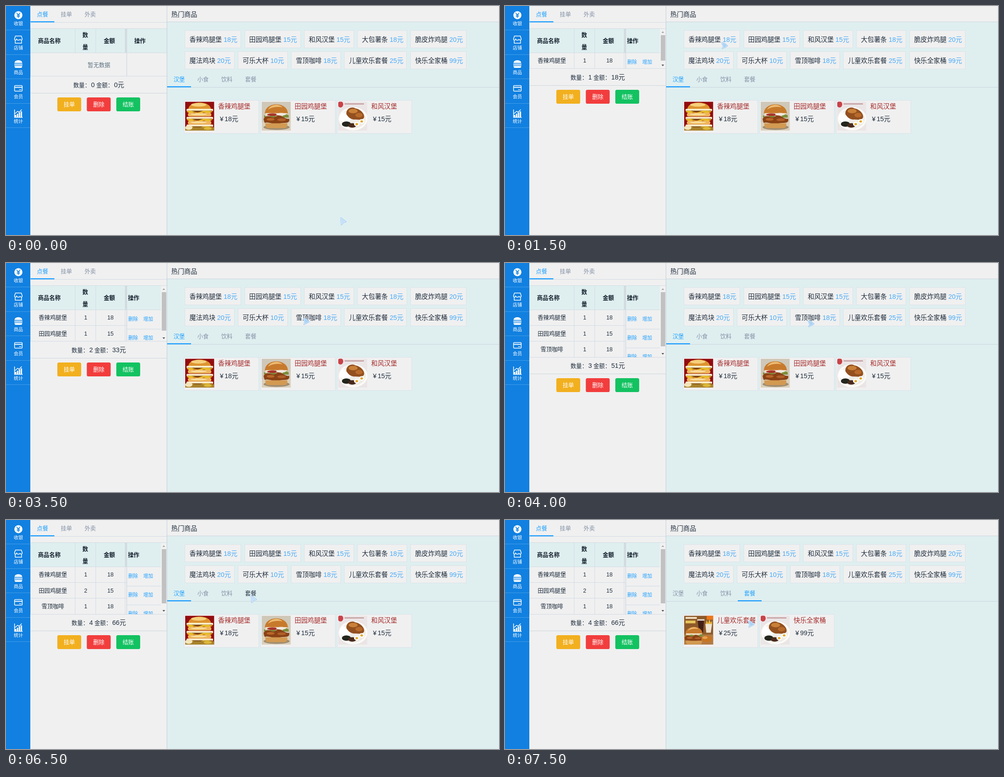
An HTML page for the animation above (8000 ms loop, 1095 by 511 pixels).

```html
<!DOCTYPE html>
<html lang="zh-CN">
<head>
<meta charset="utf-8">
<style>
html, body { margin: 0; width: 100%; height: 100%; overflow: hidden; background: #f0f0f0; }
svg { display: block; }
#stage { width: 1095px; height: 511px; font-family: "Liberation Sans", "Noto Sans CJK SC", "Noto Sans CJK", sans-serif; }
text { white-space: pre; }
.colon { font-family: "Noto Sans CJK TC", "Noto Sans CJK", sans-serif; }
</style>
</head>
<body>
<svg id="stage" viewBox="0 0 1095 511"></svg>
<script>
const INK = '#1f2d3d', BLUE = '#20a0ff', PANEL = '#f0f0f0', MINT = '#dfeff0', LINE = '#d1dbe5', GREY = '#8391a5', HEAD = '#14202c';
const MENU = [['香辣鸡腿堡', 18], ['田园鸡腿堡', 15], ['和风汉堡', 15], ['大包薯条', 18], ['脆皮炸鸡腿', 20],
  ['魔法鸡块', 20], ['可乐大杯', 10], ['雪顶咖啡', 18], ['儿童欢乐套餐', 25], ['快乐全家桶', 99]];
const STEP = 500, LOOP = 8000;
// pointer for every step: x, y, pressed
const POINTER = [[743, 472], [519, 191], [484, 81], [481, 81, 1], [484, 81], [557, 83], [557, 83, 1], [660, 123, 1],
  [673, 128, 1], [673, 255], [673, 255, 1], [673, 255], [610, 205], [544, 168], [544, 168], [540, 225, 1]];

const rect = (x, y, w, h, fill, more = '') => `<rect x="${x}" y="${y}" width="${w}" height="${h}" fill="${fill}" ${more}/>`;
const hline = (x, y, w, color = LINE) => rect(x, Math.round(y), w, 1, color);
const vline = (x, y, h, color = LINE) => rect(x, y, 1, h, color);
// a filled box with a sharp one pixel border
const box = (x, y, w, h) => rect(Math.round(x) - .5, y, Math.round(w), h, PANEL, 'stroke="#d9e2ea"');
const path = (d, fill, more = '') => `<path d="${d}" fill="${fill}" ${more}/>`;
const oval = (x, y, rx, ry, fill) => `<ellipse cx="${x}" cy="${y}" rx="${rx}" ry="${ry}" fill="${fill}"/>`;
// y is the vertical middle of the glyphs
const text = (x, y, str, size = 12.6, fill = INK, more = '') =>
  `<text x="${x}" y="${y + size * .37}" font-size="${size}" fill="${fill}" ${more}>${str}</text>`;
const MID = ' text-anchor="middle"', BOLD = ' font-weight="bold"', LIGHT = ' font-weight="300"', MEDIUM = ' font-weight="500"';

function sidebar() {
  const stroke = 'stroke="#fff" stroke-width="1.5"';
  const icons = [
    oval(27.5, 20.5, 9, 9, '#fff') + path('M23.5 15l4 5 4-5M27.5 20v6.5M24 20.5h7M24 23.5h7', 'none', 'stroke="#1180e0" stroke-width="1.5"'),
    path('M21 67h13l2 6c0 4-4 4-4.5 1c-1 3-7 3-8 0c-1 3-5 3-4.5-1zM20.5 76v7h14v-7', 'none', stroke),
    path('M19 127c0-8 17-8 17 0zM19 134h17c0 4-2 4-4 4h-9c-2 0-4 0-4-4z', '#fff') + rect(18.5, 128.5, 18, 1.6, '#fff') + rect(18.5, 131.2, 18, 1.6, '#fff'),
    rect(19, 177.5, 17, 12.5, 'none', stroke + ' rx="1.5"') + rect(19, 180.5, 17, 2, '#fff') + rect(29, 186, 5, 1.2, '#fff'),
    [0, 1, 2, 3].map(i => rect(20 + i * 4.2, 243 - i * 2.6, 3, 5 + i * 2.6, '#fff')).join('') +
      path('M19 231v17.5h18M20 240l6-5 3 2 6-6', 'none', stroke)
  ];
  return rect(0, 0, 54, 511, '#1180e0') + ['收银', '店铺', '商品', '会员', '统计'].map((label, i) =>
    icons[i] + text(27.5, 38.7 + i * 54.5, label, 10.3, '#fff', MID + MEDIUM) + hline(0, 53.4 + i * 54.5, 54, '#459fe9')).join('');
}

function tabs(labels, x, y, barY, active, hover) {
  return labels.map((label, i) =>
    text(x + 14 + i * 53, y, label, 12.6, i === active ? BLUE : i === hover ? INK : GREY)).join('') +
    rect(x + active * 53, barY, 53, 2.5, BLUE);
}

function scrollbar(bottom, thumb) {
  return rect(344, 51, 13, bottom - 51, '#f1f1f1') + rect(346, 65, 10, thumb, '#c1c1c1') +
    path('M347.5 60l3-3.5 3 3.5z', '#a3a3a3') + path(`M347.5 ${bottom - 9}l3 3.5 3-3.5z`, '#505050');
}

function orderTable(order) {
  const n = order.length, bottom = n ? 104.5 + n * 35.2 : 157, right = n ? 344 : 357;
  const heading = (x, y, label) => text(x, y, label, 12.6, HEAD, BOLD);
  let out = rect(55, 51, right - 55, 53, MINT) + hline(55, 50, 302) +
    heading(71, 77.5, '商品名称') + heading(169.7, 64.5, '数') + heading(169.7, 91, '量') +
    heading(217, 77.5, '金额') + heading(n ? 271 : 285, 77.5, '操作') +
    rect(264, 51, 5, 53, '#d2dcdf') + hline(55, 104, right - 55) + vline(54, 51, bottom - 51);
  for (const x of [153, 199]) out += vline(x, 51, (n ? bottom : 104) - 51);
  out += rect(267.5, 104, 1.5, bottom - 104, '#d3d9e0');
  if (n) {
    out += vline(264, 104, bottom - 104) + '<clipPath id="rows">' + rect(55, 51, 303, bottom - 51, '#000') + '</clipPath><g clip-path="url(#rows)">';
    order.forEach(([item, count], i) => {
      const y = 121.7 + i * 35.2, opY = 125 + i * 42.2;
      const [name, price] = MENU[item];
      out += text(104, y, name, 12.6, INK, MID) + text(177, y, count, 12.6, INK, MID) + text(232, y, price, 12.6, INK, MID) +
        hline(55, 104 + (i + 1) * 35.2, 213) + hline(269, opY + 21.8, 75) +
        text(271.5, opY, '删除', 10.8, BLUE) + text(305, opY, '增加', 10.8, BLUE);
    });
    out += '</g>' + scrollbar(bottom, [57, 86, 121][n - 1]);
  } else out += text(206.5, 131.5, '暂无数据', 12.6, '#5e7382', MID);
  return out + hline(55, bottom - .6, 302) + summary(order, bottom);
}

function summary(order, top) {
  const count = order.reduce((sum, [, c]) => sum + c, 0);
  const total = order.reduce((sum, [item, c]) => sum + c * MENU[item][1], 0);
  const x = count ? 145.5 : 149.5, y = top + 19.5, colon = '<tspan class="colon">：</tspan>';
  const button = (bx, label, color) => rect(bx, Math.round(top + 47), 53, 31, color, 'rx="3.6"') + text(bx + 26.5, top + 62.7, label, 12.6, '#fff', MID);
  return text(x, y, '数量' + colon) + text(x + 39.5, y - .5, count, 14.4) + text(x + 51, y, '金额' + colon) +
    text(x + 90.5, y - .5, total + '元', 14.4, INK, LIGHT) + hline(55, top + 37.2, 302, '#ccd5dd') +
    button(114, '挂单', '#f2b01f') + button(179.5, '删除', '#f23d3d') + button(245, '结账', '#13c261');
}

function chips() {
  let x = 398;
  return MENU.map(([name, price], i) => {
    if (i === 5) x = 398;
    const y = i < 5 ? 54.5 : 101.5, w = name.length * 14.4 + 52;
    const out = box(x, y, w, 39) + text(x + 9.5, y + 19.7, name, 14.4, INK, LIGHT) +
      text(x + 9.5 + name.length * 14.4 + 4, y + 19.7, price + '元', 14.4, '#45a9f8', LIGHT);
    x += w + 8.5;
    return out;
  }).join('');
}

const burger = (x, y, s) => `<g transform="translate(${x} ${y}) scale(${s})">` +
  path('M0 21C0-7 52-7 52 21z', '#c77a2c') + path('M7 12C14-1 32-2 40 7C28 4 16 6 7 12z', '#edbb72') +
  rect(1, 20, 50, 5, '#eee0c5', 'rx="2"') + path('M-2 24q7 7 14 2t14 2 14-1 14-2v5H-2z', '#7d8f3c') +
  path('M-3 33q6-9 15-5t14-1 14 1 15 5q2 9-8 9t-15 2-17-1-14-1-4-9z', '#8a4215') + oval(13, 34, 9, 3, '#b9672a') + oval(38, 35, 10, 3, '#b0602a') +
  path('M1 43h50c0 11-4 11-10 11H11c-6 0-10 0-10-11z', '#d39a52') + '</g>';

const PHOTOS = {
  tower: () => rect(0, 0, 64.5, 64.5, '#930d10') + path('M7 17C7-3 57-3 57 17z', '#dd942f') + oval(30, 7, 17, 4, '#f6cf7c') +
    [16, 34, 51].map(y => rect(3, y, 59, 5, '#fff3d0', 'rx="2"') + rect(5, y + 4, 55, 3, '#7c4a14', 'rx="1"') +
      path(`M3 ${y + 6}q8-4 16 0t16 0 26 0l-9 5-11-3-9 4-12-4-9 3z`, '#e8bd2b') + rect(6, y + 9, 52, 8, '#eeb65a', 'rx="4"') +
      oval(30, y + 12, 18, 2, '#f9dda0')).join('') +
    rect(0, 57, 64.5, 7.5, '#a8822c') + oval(8, 58, 8, 5, '#f2e5bb') + oval(50, 60, 9, 3, '#ddb83c'),
  classic: () => rect(0, 0, 64.5, 64.5, '#cfc8b8') + rect(0, 46, 64.5, 18.5, '#dbd0bb') + oval(33, 57, 29, 6, '#a08e73') +
    burger(7, 6, .98) + oval(24, 29, 12, 3, '#a8332a') + oval(43, 28, 11, 3, '#f0e9df'),
  plate: () => rect(0, 0, 64.5, 64.5, '#ebe5e6') + oval(5, 6, 6, 7, '#c94247') + rect(14, 4, 43, 2, '#b9898c') +
    oval(33, 38, 32, 26, '#fcfbf8') + oval(33, 38, 28, 22, '#efece7') + oval(16, 35, 13, 11, '#fff') +
    path('M18 28C17 15 30 10 38 15C48 16 60 27 57 36C52 43 42 39 35 40C26 39 22 34 18 28z', '#93501f') +
    oval(33, 21, 10, 5, '#c98038') + oval(46, 30, 8, 5, '#b86a2b') + oval(18, 50, 10, 6, '#23261d') +
    oval(31, 53, 9, 5, '#4a2a1c') + [[52, 44], [41, 50]].map(([x, y]) => oval(x, y, 6, 5, '#fff') + oval(x, y, 3, 2.6, '#e4a92e')).join(''),
  combo: () => rect(0, 0, 64.5, 64.5, '#8d5a2a') + rect(0, 42, 64.5, 22.5, '#b47b43') + rect(3, 3, 25, 4, '#f4e5ca') +
    rect(3, 11, 22, 6, '#e7c65c') + rect(50, 0, 14.5, 9, '#ef7618') + path('M30 10h14l-2 28H33z', '#432017') +
    rect(29, 8, 16, 3, '#eee4d8') + path('M47 18h15l-3 20H49z', '#efe4d2') + path('M48 18l2-8 3 7 3-9 3 8 3-5v8z', '#e9b742') +
    burger(3, 25, .72) + oval(50, 52, 12, 7, '#c87522') + oval(46, 49, 6, 3, '#e6a24d')
};

function cards(list) {
  return list.map(([item, photo], i) => {
    const x = 395.5 + i * 170, [name, price] = MENU[item];
    return box(x, 210.5, 166, 74) +
      `<svg x="${x + 2.5}" y="213.5" width="64.5" height="64.5">${PHOTOS[photo]()}</svg>` +
      text(x + 75.5, 224, name, 14.4, '#a52a2a', LIGHT) + text(x + 79.5, 252, '¥', 14.4, INK) +
      text(x + 90, 252, price + '元', 14.4, INK, LIGHT);
  }).join('');
}

function pointer([x, y, pressed]) {
  const shape = pressed ? 'M.5 1L6 2L13 8L8 11L2 14L4 9z' : 'M1 1L12 9.5L6.5 11L2 16z';
  const edge = (color, width) => `stroke="${color}" stroke-width="${width}" stroke-linejoin="round"`;
  return `<g transform="translate(${x} ${y})">` + path(shape, '#8fbcec', edge('#9cc4ee', 2.4)) +
    path(shape, pressed ? '#a9d3f6' : '#c4e0fb', edge('#e3f1fd', .8)) + '</g>';
}

function scene(step) {
  const order = [[0, 1], [1, step < 9 ? 1 : 2], [7, 1]].slice(0, [3, 6, 8].filter(s => step >= s).length);
  const combos = step >= 14;
  return rect(0, 0, 1095, 511, PANEL) + sidebar() +
    hline(55, 36, 302) + tabs(['点餐', '挂单', '外卖'], 54.5, 18.5, 34, 0) + orderTable(order) +
    rect(358, 36, 737, 475, MINT) + hline(358, 35, 737, '#c9d4dd') + vline(357, 0, 511, '#c0ccda') +
    text(367, 19, '热门商品', 14.4, INK, LIGHT) + chips() +
    hline(358, 181, 737, '#c9d5de') + tabs(['汉堡', '小食', '饮料', '套餐'], 358, 163.3, 179, combos ? 3 : 0, step === 13 ? 3 : -1) +
    cards(combos ? [[8, 'combo'], [9, 'plate']] : [[0, 'tower'], [1, 'classic'], [2, 'plate']]) + pointer(POINTER[step]);
}

const stage = document.getElementById('stage');
const start = performance.now();
let shown = -1;
function tick() {
  const step = Math.floor((performance.now() - start) % LOOP / STEP);
  if (step !== shown) stage.innerHTML = scene(shown = step);
  requestAnimationFrame(tick);
}
tick();
</script>
</body>
</html>
```
